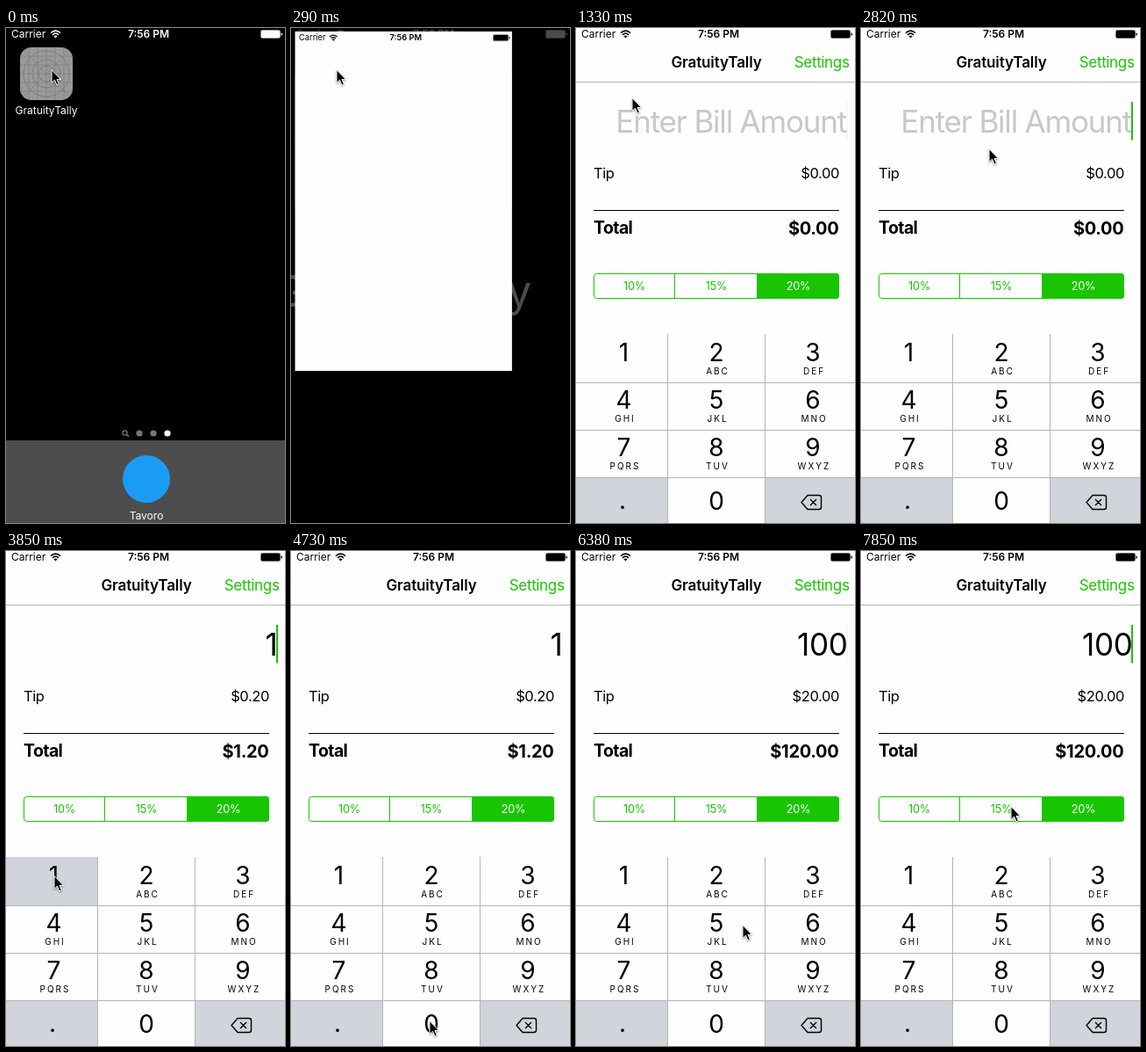
Recreate the animation shown at these times as an HTML page. Size 318 by 563 pixels, loop 8000 ms.

```html
<!DOCTYPE html>
<html lang="en">
<head>
<meta charset="utf-8">
<title>Tip calculator demo</title>
<style>
html, body { margin: 0; width: 100%; height: 100%; overflow: hidden; background: #000; }
#stage { display: block; width: 100vw; height: 100vh; }
#pointer { filter: drop-shadow(0 1px 1px rgba(0, 0, 0, .4)); }
text { font-family: Inter, "Open Sans", sans-serif; white-space: pre; }
.mid { text-anchor: middle; }
.end { text-anchor: end; }
.small { font-size: 12px; }
.clock { font-size: 12px; font-weight: 600; }
.body { font-size: 16.5px; letter-spacing: -.4px; }
.link { font-size: 17px; letter-spacing: -.35px; }
.nav { font-size: 17px; font-weight: 600; letter-spacing: -.1px; }
.bold { font-size: 19.5px; font-weight: 700; letter-spacing: -.6px; }
.sum { font-size: 20px; font-weight: 700; letter-spacing: -.3px; }
.bill { font-size: 35px; letter-spacing: -.3px; }
.hint { font-size: 35px; letter-spacing: -1.2px; fill: #c7c7cd; }
.seg { font-size: 12.7px; letter-spacing: -.2px; }
.digit { font-size: 28px; }
.letters { font-size: 10px; letter-spacing: 2px; }
.green { fill: #19c500; }
</style>
</head>
<body>
<svg id="stage" viewBox="0 0 318 563" preserveAspectRatio="none"></svg>
<script>
const LOOP = 8000, STEPS = 54;
const APP_NAME = "GratuityTally";
const GREEN = "#19c500", KEY_GRAY = "#d1d4da";

const label = (x, y, cls, str, extra = "") =>
  `<text x="${x}" y="${y}" class="${cls}" ${extra}>${str}</text>`;
const box = (x, y, w, h, fill, extra = "") =>
  `<rect x="${x}" y="${y}" width="${w}" height="${h}" fill="${fill}" ${extra}/>`;
const stroke = (d, color, width = 1, extra = "") =>
  `<path d="${d}" fill="none" stroke="${color}" stroke-width="${width}" ${extra}/>`;

const statusBar = (id, color) => `<g id="${id}" fill="${color}">
  ${label(6, 11, "small", "Carrier")}
  ${stroke("M51 5.6Q56.5 .6 62 5.6M53 7.8Q56.5 4.6 60 7.8", color, 1.6)}
  <path d="M54.4 9.3Q56.5 7.6 58.6 9.3L56.5 11.6Z"/>
  ${label(162.5, 11, "clock mid", "7:56 PM")}
  ${box(290.5, 2.5, 22, 9, "none", `rx="1.8" stroke="${color}" stroke-opacity=".6"`)}
  ${box(291, 3, 21, 8, color, 'rx=".8"')}
  <path d="M313.5 5.2Q315 5.6 315 7T313.5 8.8Z"/></g>`;

function placeholderIcon() {
  let d = "M20 26L72 78M72 26L20 78";
  for (const o of [10, 20, 30, 40, 50]) d += `M${16 + o} 22V82M16 ${22 + o}H76`;
  const rings = [9, 16, 26].map(r =>
    `<circle cx="46" cy="52" r="${r}" fill="none" stroke="#757575" stroke-width=".7"/>`).join("");
  return box(16, 22, 60, 60, "#999", 'rx="13"') + stroke(d, "#7b7b7b", .6) + rings;
}

const homeScreen = `<g id="home">
  ${placeholderIcon()}
  ${label(46, 98, "small mid", APP_NAME, 'fill="#fff"')}
  <g id="dock">
    <circle cx="135.5" cy="460.5" r="2.6" fill="none" stroke="#777" stroke-width="1.3"/>
    ${stroke("M137.5 462.5L140 465", "#777", 1.5)}
    <circle cx="152" cy="461" r="3.6" fill="#777"/><circle cx="168" cy="461" r="3.6" fill="#777"/>
    <circle cx="184" cy="461" r="3.6" fill="#fff"/>
    ${box(0, 469, 318, 94, "#4d4d4d")}
    <circle cx="160" cy="513" r="27" fill="#1b9cf3"/>
    ${label(160, 559, "small mid", "Tavoro", 'fill="#fff"')}
  </g></g>
  ${statusBar("homeStatus", "#fff")}`;

function keypad() {
  const columns = [54.5, 160, 270];
  const letters = ["", "ABC", "DEF", "GHI", "JKL", "MNO", "PQRS", "TUV", "WXYZ"];
  const keys = letters.map((str, i) => {
    const x = columns[i % 3], y = 379 + 54 * Math.floor(i / 3);
    return label(x, y, "digit mid", i + 1) + label(x + 1.5, y + 15, "letters mid", str);
  }).join("");
  return `<g id="keypad">${box(0, 348, 318, 215, "#fefefe")}
    ${box(0, 512, 104, 51, KEY_GRAY)}${box(216, 512, 102, 51, KEY_GRAY)}
    ${box(0, 348, 104, 55, KEY_GRAY, 'id="key1"')}${box(105, 512, 110, 51, KEY_GRAY, 'id="key0"')}
    ${stroke("M104.5 348V563M215.5 348V563M0 403.5H318M0 457.5H318M0 511.5H318", "#b4b4b6")}
    ${keys}${label(53, 547, "digit mid", ".")}${label(160, 548, "digit mid", "0")}
    ${stroke("M264 531.5H277Q279.5 531.5 279.5 534V545Q279.5 547.5 277 547.5H264L257 539.5ZM267 536L274 543M274 536L267 543",
      "#000", 1.4, 'stroke-linejoin="round"')}</g>`;
}

const appScreen = `<svg id="app">
  ${box(0, 0, 318, 563, "#fefefe")}${statusBar("appStatus", "#000")}
  <g id="content">
    ${label(160, 45, "nav mid", APP_NAME)}
    ${label(311.5, 45, "link end green", "Settings")}
    ${stroke("M0 61.5H318", "#b8b8b8")}
    ${label(308, 119, "hint end", "Enter Bill Amount", 'id="hint"')}
    ${label(309.5, 119, "bill end", "", 'id="bill"')}
    ${box(308, 84, 2, 43.5, GREEN, 'id="caret"')}
    ${label(20, 171, "body", "Tip")}${label(300, 171, "body end", "", 'id="tip"')}
    ${stroke("M20 207.5H300", "#000")}
    ${label(20, 234, "bold", "Total")}${label(299.5, 235, "sum end", "", 'id="total"')}
    ${box(20.5, 279.5, 279, 28, "none", `rx="3.2" stroke="${GREEN}"`)}
    ${stroke("M112.5 279V308", GREEN)}
    <path d="M206 279H296.3Q300 279 300 282.7V304.3Q300 308 296.3 308H206Z" class="green"/>
    ${label(66.5, 298, "seg mid green", "10%")}${label(160, 298, "seg mid green", "15%")}
    ${label(253.5, 298, "seg mid", "20%", 'fill="#fff"')}
    ${keypad()}
  </g></svg>`;

const pointer = `<path id="pointer" d="M0 -.5V14.4L3.5 11.2L6 17L8.4 15.9L6 10.4H10.6Z"
  fill="#000" stroke="#fff" stroke-linejoin="round"/>`;

const stage = document.getElementById("stage");
stage.innerHTML = homeScreen + appScreen + pointer;
const el = {};
stage.querySelectorAll("[id]").forEach(node => el[node.id] = node);
const set = (id, attrs) => {
  for (const name in attrs) el[id].setAttribute(name, attrs[name]);
};

// Piecewise linear interpolation over [step, value] points.
function track(points, k) {
  if (k <= points[0][0]) return points[0][1];
  for (let i = 1; i < points.length; i++) {
    const [k0, a] = points[i - 1], [k1, b] = points[i];
    if (k <= k1) return a + (b - a) * (k - k0) / (k1 - k0);
  }
  return points[points.length - 1][1];
}

const zoomTrack = [[0, 0], [1, .14], [2, .727], [3, .96], [4, 1]];
const fadeTrack = [[3, 0], [4, .15], [5, .5], [6, .85], [7, 1]];
const slideTrack = [[3, 215], [4, 170], [5, 83], [6, 27], [7, 6], [8, 0]];
const pointerPath = [
  [5, 52, 48], [8, 64, 80], [10, 64, 80], [12, 110, 112], [13, 124, 122], [14, 124, 122],
  [16, 146, 138], [21, 146, 138], [22, 125, 190], [24, 68, 340], [25, 56, 366], [26, 55, 370],
  [27, 70, 400], [29, 152, 508], [30, 156, 524], [32, 158, 535], [40, 158, 535], [41, 165, 515],
  [43, 190, 426], [45, 197, 370], [48, 190, 311], [50, 178, 297], [52, 171, 291]];
const pointerX = pointerPath.map(([k, x]) => [k, x]);
const pointerY = pointerPath.map(([k, , y]) => [k, y]);

function caretAlpha(k) {
  if (k >= 26 && k < 39) return k < 30 || k > 34 ? 1 : k < 32 ? .5 : 0;
  const start = k < 26 ? 5 : 4;
  return [1, 1, 1, .5, .06, 0, .5][(k + 7 - start) % 7];
}

function render(ms) {
  const k = Math.floor(ms * STEPS / LOOP + .08) % STEPS;
  const p = track(zoomTrack, k);

  const x = 16 * (1 - p), y = 22 * (1 - p) ** 1.35;
  const w = 60 + 258 * p, h = w * (1 + (563 / 318 - 1) * p), scale = w / 60;
  set("app", { x, y, width: w, height: h, viewBox: `0 0 318 ${h * 318 / w}`, opacity: Math.min(1, p * 3) });
  set("appStatus", { transform: `translate(0 ${9 * (1 - p)})` });
  set("home", {
    transform: `translate(${x + w / 2 - 46 * scale} ${y - 22 * scale}) scale(${scale})`,
    opacity: 1 - p * .97 });
  set("homeStatus", { opacity: 1 - p * .97 });

  const bill = k >= 38 ? "100" : k >= 36 ? "10" : k >= 26 ? "1" : "";
  el.bill.textContent = bill;
  el.tip.textContent = "$" + (bill * .2).toFixed(2);
  el.total.textContent = "$" + (bill * 1.2).toFixed(2);
  set("hint", { opacity: bill ? 0 : 1 });
  set("caret", { opacity: caretAlpha(k) });
  set("tip", { opacity: track([[4, 0], [5, .4], [7, 1]], k) });
  set("total", { opacity: track([[5, 0], [7, .9], [8, 1]], k) });
  set("content", { opacity: track(fadeTrack, k) });
  set("keypad", { transform: `translate(0 ${track(slideTrack, k)})` });
  set("key1", { opacity: k === 25 || k === 26 ? 1 : 0 });
  set("key0", { opacity: k === 35 || k === 37 ? 1 : 0 });
  set("pointer", { transform: `translate(${track(pointerX, k)} ${track(pointerY, k)})` });
}

const began = performance.now();
function tick() {
  render((performance.now() - began) % LOOP);
  requestAnimationFrame(tick);
}
render(0);
requestAnimationFrame(tick);
</script>
</body>
</html>
```
